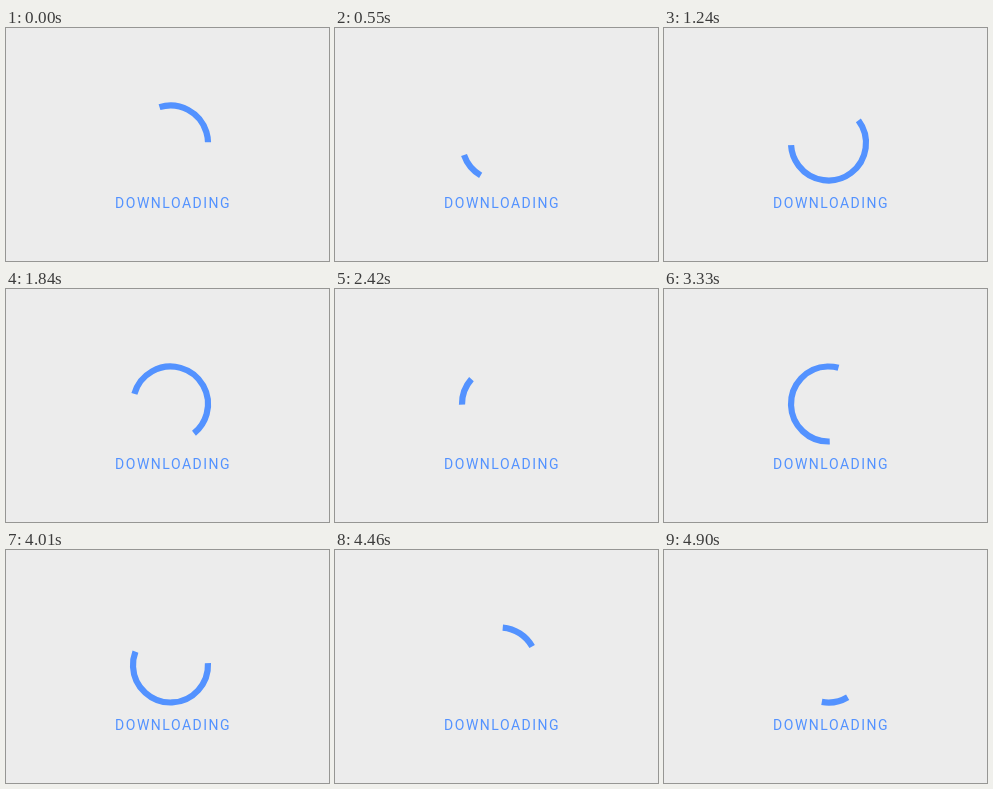
Write an HTML page that moves like this. It is 323 px wide and 233 px high and loops after 4.92 s.

```html
<!DOCTYPE html>
<html lang="en">
<head>
<meta charset="utf-8">
<title>Downloading</title>
<style>
  html, body { margin: 0; width: 100%; height: 100%; overflow: hidden; background: #ececec; }
  svg { display: block; width: 323px; height: 233px; }
  circle { fill: none; stroke: #5392ff; stroke-width: 6.2; }
  text { font: 400 14px Roboto, sans-serif; letter-spacing: 1.5px; fill: #5392ff; }
</style>
</head>
<body>
<svg viewBox="0 0 323 233">
  <circle id="arc" cx="164.5" cy="115" r="37.5" pathLength="360"/>
  <text x="109.1" y="179.5">DOWNLOADING</text>
</svg>
<script>
  const LOOP = 4920;              // ms
  const FRAMES = 179;
  const STEP = LOOP / FRAMES;
  const SPIN = 0.295;             // degrees per ms
  const MIN_ARC = 41;
  const GROWTH = 229;             // extra degrees at full length
  const SWEEP = 925;              // ms to grow, and again to shrink
  const CYCLE = 2136;             // grow, shrink, pause
  const FIRST_GROW = 617;

  const arc = document.getElementById('arc');

  const ease = u => (1 - Math.cos(Math.PI * Math.min(1, u))) / 2;

  // Degrees gained by one end of the arc, whose sweeps begin at `start` in each cycle.
  function travel(time, start) {
    const cycle = Math.floor((time - start) / CYCLE);
    return GROWTH * (cycle + ease((time - start - cycle * CYCLE) / SWEEP));
  }

  function draw(time) {
    const base = time * SPIN - 1;
    const head = base + travel(time, FIRST_GROW);
    const tail = base - MIN_ARC + travel(time, FIRST_GROW + SWEEP);
    const length = head - tail;
    arc.setAttribute('stroke-dasharray', `${length} ${360 - length}`);
    arc.setAttribute('transform', `rotate(${tail % 360} 164.5 115)`);
  }

  function tick() {
    const time = performance.now() % LOOP;
    const frame = Math.min(FRAMES - 1, Math.floor(time / STEP + 0.33));
    draw(frame * STEP);
    requestAnimationFrame(tick);
  }
  tick();
</script>
</body>
</html>
```
